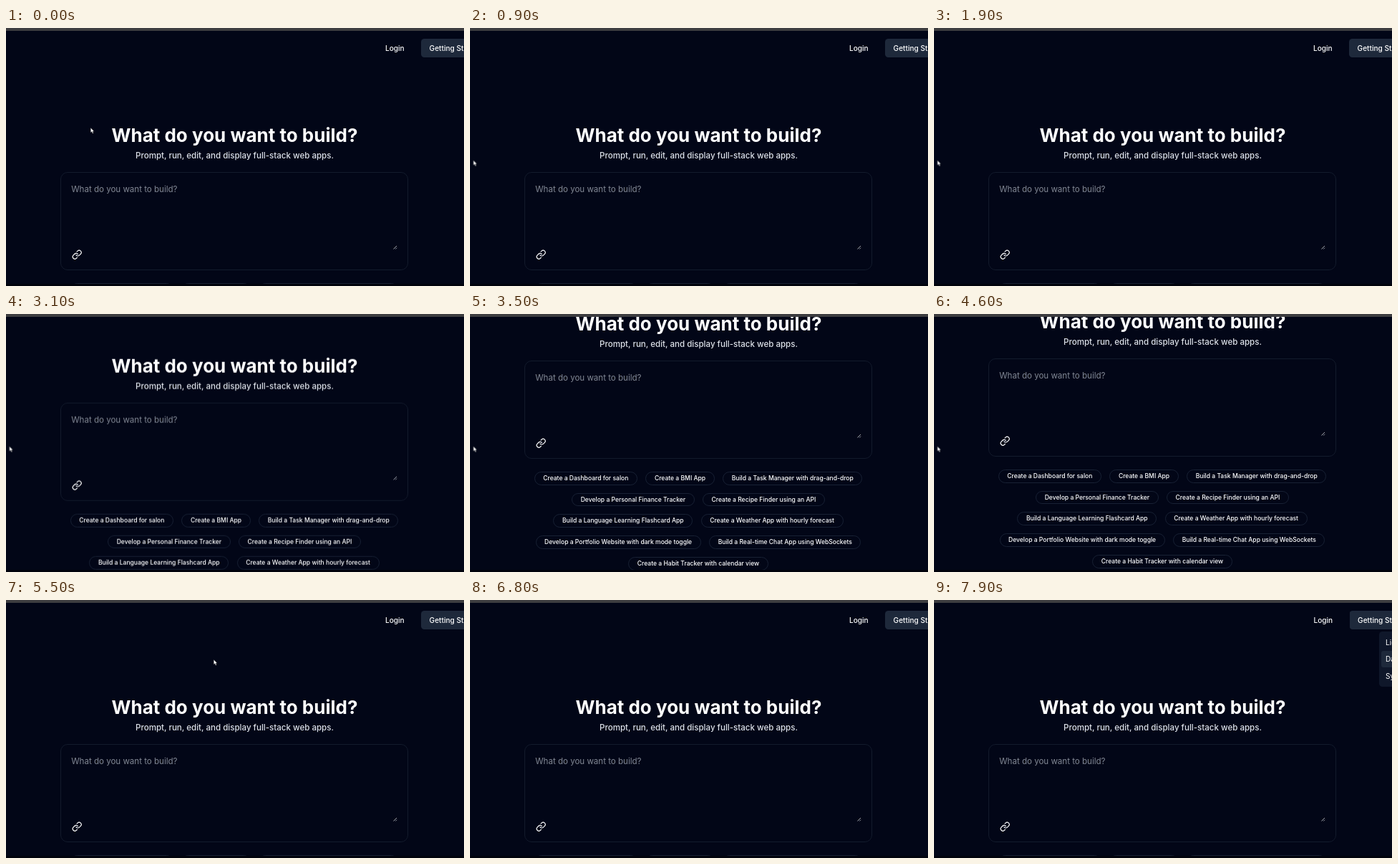
Recreate the animation shown at these times as an HTML page. Size 640 by 360 pixels, loop 8 s.

```html
<!DOCTYPE html>
<html lang="en">
<head>
<meta charset="utf-8">
<title>What do you want to build?</title>
<style>
  html, body { margin: 0; width: 100%; height: 100%; overflow: hidden; background: #020617; }
  .stage {
    position: relative; width: 640px; height: 360px; overflow: hidden;
    background: #020617; color: #fff;
    font-family: Inter, "Open Sans", sans-serif;
  }
  .stage * { box-sizing: border-box; }
  .page, .page > *, .bar, .edge, .cursor, .menu, .menu span, .grip, .link { position: absolute; }
  .page { inset: 0; animation: scroll 8s infinite; }
  .bar { left: 0; top: 0; width: 100%; height: 4px; background: #3d3d40; }
  .edge { left: 0; bottom: 0; width: 100%; height: 3px; background: #01030c; }

  h1, p { margin: 0; left: 0; width: 639px; text-align: center; white-space: nowrap; }
  h1 { top: 133.5px; font-size: 26px; line-height: 32px; font-weight: 700; }
  p { top: 168.4px; font-size: 11.55px; line-height: 20px; font-weight: 500; color: #dde1e8; }

  .nav { font-size: 10.1px; line-height: 26px; top: 15px; font-weight: 500; white-space: nowrap; animation: nudge 8s step-end infinite; }
  .login { left: 530px; }
  .start { left: 580px; width: 102px; height: 26px; padding-left: 11.6px; border-radius: 4.5px; background: #1e293b; }

  .card { left: 76px; top: 201px; width: 486px; height: 137px; border: 1px solid #131b2c; border-radius: 10px; }
  .hint { left: 91.2px; top: 215.4px; font-size: 11.55px; line-height: 20px; color: #828894; white-space: nowrap; }
  .link { left: 91.5px; top: 309px; }
  .grip { left: 540px; top: 302px; }

  .row { left: 0; width: 638px; display: flex; justify-content: center; gap: 11.5px; }
  .row span {
    height: 18.8px; padding: 0 11.5px; border: 1px solid #182134; border-radius: 10px;
    font-size: 8.55px; line-height: 17px; font-weight: 500; white-space: nowrap;
  }

  .menu {
    left: 622px; top: 44px; width: 92px; height: 77px; border-radius: 4.5px;
    background: #0f172a; font-size: 10.1px; line-height: 23px; opacity: 0;
    animation: open 8s infinite;
  }
  .menu span { left: 3px; width: 86px; height: 23px; padding-left: 6px; border-radius: 3px; }
  .menu .dark { animation: hover 8s step-end infinite; }

  .cursor { left: 0; top: 0; animation: point 8s infinite; }

  @keyframes scroll {
    0%, 34.5% { transform: translateY(0); animation-timing-function: cubic-bezier(.4, .1, .75, .75); }
    38.75% { transform: translateY(-77px); animation-timing-function: cubic-bezier(.25, .45, .55, 1); }
    43.75% { transform: translateY(-136px); animation-timing-function: ease-out; }
    46.25%, 57.5% { transform: translateY(-139px); animation-timing-function: ease-in-out; }
    64%, 100% { transform: translateY(0); }
  }
  @keyframes point {
    0%, 1.25% { transform: translate(118px, 139px); animation-timing-function: ease-in-out; }
    10%, 61% { transform: translate(4.5px, 184.5px); animation-timing-function: ease-in-out; }
    68.75%, 70% { transform: translate(290px, 83px); animation-timing-function: ease-in-out; }
    79%, 86% { transform: translate(662px, 28px); animation-timing-function: ease-in-out; }
    91%, 100% { transform: translate(664px, 82px); }
  }
  @keyframes open {
    0%, 86% { opacity: 0; transform: translateY(-2px); }
    87.5%, 100% { opacity: 1; transform: none; }
  }
  @keyframes hover {
    0% { background: transparent; }
    90%, 100% { background: #1e293b; }
  }
  @keyframes nudge {
    0% { transform: none; }
    86%, 100% { transform: translateX(.5px); }
  }
</style>
</head>
<body>
<div class="stage">
  <div class="page">
    <div class="nav login">Login</div>
    <div class="nav start">Getting Started</div>
    <h1>What do you want to build?</h1>
    <p>Prompt, run, edit, and display full-stack web apps.</p>
    <div class="card"></div>
    <div class="hint">What do you want to build?</div>
    <svg class="link" width="14.4" height="14.4" viewBox="0 0 24 24" fill="none" stroke="#fff" stroke-width="2" stroke-linecap="round" stroke-linejoin="round">
      <path d="M10 13a5 5 0 0 0 7.54.54l3-3a5 5 0 0 0-7.07-7.07l-1.72 1.71"/>
      <path d="M14 11a5 5 0 0 0-7.54-.54l-3 3a5 5 0 0 0 7.07 7.07l1.71-1.71"/>
    </svg>
    <svg class="grip" width="8" height="8" stroke="#b5b9c0" stroke-width=".9">
      <path d="M1.5 6.5 6 2M4.2 6.5 6 4.7"/>
    </svg>
  </div>

  <div class="menu">
    <span style="top:3.5px">Light</span>
    <span class="dark" style="top:27px">Dark</span>
    <span style="top:50.5px">System</span>
  </div>
  <div class="bar"></div>
  <div class="edge"></div>
  <svg class="cursor" width="8" height="11">
    <path d="M.3.3V7L1.9 5.6 3 8.2 4.2 7.7 3.1 5.2H5.2Z" fill="#fff" stroke="#000" stroke-width=".3"/>
  </svg>
</div>
<script>
  const rows = [
    ["Create a Dashboard for salon", "Create a BMI App", "Build a Task Manager with drag-and-drop"],
    ["Develop a Personal Finance Tracker", "Create a Recipe Finder using an API"],
    ["Build a Language Learning Flashcard App", "Create a Weather App with hourly forecast"],
    ["Develop a Portfolio Website with dark mode toggle", "Build a Real-time Chat App using WebSockets"],
    ["Create a Habit Tracker with calendar view"]
  ];
  const page = document.querySelector(".page");
  rows.forEach((labels, i) => {
    const row = document.createElement("div");
    row.className = "row";
    row.style.top = 355.8 + i * 29.75 + "px";
    for (const label of labels) {
      const chip = document.createElement("span");
      chip.textContent = label;
      row.append(chip);
    }
    page.append(row);
  });
</script>
</body>
</html>
```
